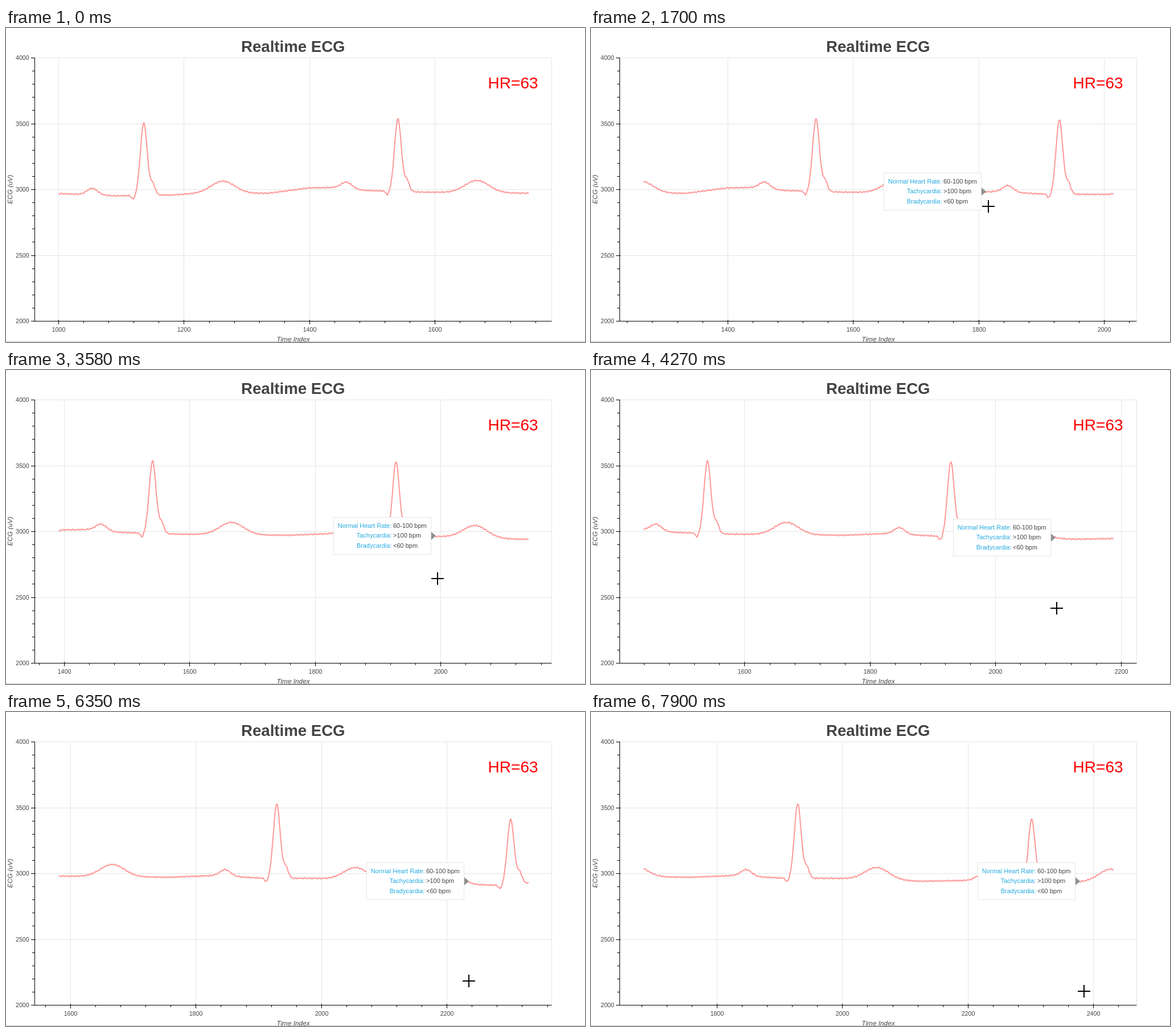
Animation, 1017 px wide and 551 px high, one loop 7990 ms. Source, as an HTML page:

```html
<!DOCTYPE html>
<html lang="en">
<head>
<meta charset="utf-8">
<title>Realtime ECG</title>
<style>
  html, body { margin: 0; width: 100%; height: 100%; overflow: hidden; background: #fff; }
  svg { display: block; width: 100%; height: 100%; font-family: "Liberation Sans", Arial, sans-serif; }
  text { fill: #444; }
  .title { font-size: 27.6px; font-weight: bold; text-anchor: middle; }
  .rate { font-size: 28px; fill: #f00; }
  .tick { font-size: 10.67px; }
  .name { font-size: 11.8px; font-style: italic; text-anchor: middle; }
  .grid { stroke: #e5e5e5; fill: none; }
  .axis { stroke: #000; fill: none; }
  .mid { text-anchor: middle; }
  .end { text-anchor: end; }
  .tip { font-size: 11px; }
  .tip .end { fill: #26aae1; }
</style>
</head>
<body>
<svg viewBox="0 0 1017 551">
  <path d="M0 550.5H1017" stroke="#c8c8c8"/>
  <g id="yAxis"></g>
  <path class="grid" d="M50.5 52.5H958.5V514.5"/>
  <g id="xAxis"></g>
  <path id="trace" fill="none" stroke="#ff9999" stroke-width="2" stroke-linejoin="round"/>
  <path class="axis" d="M50.5 52V515M50 514.5H958.5"/>
  <text class="title" x="504.3" y="42">Realtime ECG</text>
  <text class="rate" x="846.6" y="106">HR=63</text>
  <text class="name" x="504.5" y="550">Time Index</text>
  <text class="name" transform="translate(11 283) rotate(-90)">ECG (uV)</text>
  <g id="tip" class="tip">
    <rect x="-179.5" y="-32.5" width="171" height="65" fill="#fff" stroke="#e5e5e5"/>
    <path d="M-8 -7L0 0L-8 7Z" fill="#909090"/>
  </g>
  <path id="cross" d="M-11 0H11M0 -11V11" stroke="#000" stroke-width="2"/>
</svg>
<script>
const LOOP = 7990, STEP = 77.45;
const FIRST = 1000, LAST = 2450, SPAN = 749;
const LEFT = 50, RIGHT = 958, BOTTOM = 514, ORIGIN = 92.5, SCALE = 1.1021;
const $ = id => document.getElementById(id);

function add(parent, tag, attrs, text = '') {
  const el = document.createElementNS('http://www.w3.org/2000/svg', tag);
  for (const key in attrs) el.setAttribute(key, attrs[key]);
  el.textContent = text;
  return parent.appendChild(el);
}
const snap = v => Math.floor(v) + 0.5;
const move = (el, x, y) => el.setAttribute('transform', `translate(${x} ${y})`);
const show = (el, on) => el.setAttribute('visibility', on ? 'visible' : 'hidden');

// Linear interpolation between rows of [position, ...values]
function at(keys, pos) {
  const i = keys.findIndex(key => key[0] >= pos);
  if (i < 1) return keys.at(i).slice(1);
  const a = keys[i - 1], b = keys[i];
  const u = (pos - a[0]) / (b[0] - a[0]);
  return a.slice(1).map((v, k) => v + (b[k + 1] - v) * u);
}

// The signal: a wandering baseline, and the same set of waves around each beat
const baseline = [
  [1000, 290.5], [1090, 294.5], [1180, 293], [1220, 290.5], [1334, 290], [1400, 280.5],
  [1440, 280], [1490, 285], [1583, 288], [1757, 290], [1827, 287], [1906, 291.5],
  [1990, 292], [2126, 297], [2200, 295.5], [2251, 303], [2280, 304], [2340, 299], [2450, 297]
];
const beats = [[1135.7, 127], [1540.7, 127], [1928.6, 130.5], [2301.4, 114]];
const bell = (d, width) => Math.exp(-d * d / (2 * width * width));

function wave(d, height) {
  const p = 11.5 * bell(d + 82, 8.5);
  const q = -7 * bell(d + 16.5, 2.6);
  const r = height * bell(d, 5.4);
  const s = 19 * bell(d - 14.3, 4);
  const t = 21.5 * bell(d - 126, 19);
  return p + q + r + s + t;
}
function signal(x) {
  const ripple = 0.8 * Math.sin(x * 2 * Math.PI / 4.7) + 0.4 * Math.sin(x * 0.83);
  return beats.reduce((y, [peak, height]) => y - wave(x - peak, height), at(baseline, x)[0] + ripple);
}
const samples = Array.from({ length: LAST - FIRST + 1 }, (_, i) => signal(FIRST + i).toFixed(2));

// Fixed vertical axis
for (let v = 2000; v <= 4000; v += 100) {
  const major = v % 500 === 0;
  const y = snap(514.5 - (v - 2000) * 0.231);
  if (major) {
    add($('yAxis'), 'path', { class: 'grid', d: `M50 ${y}H958` });
    add($('yAxis'), 'text', { class: 'tick end', x: 40.7, y: y + 3.2 }, v);
  }
  add($('yAxis'), 'path', { class: 'axis', d: major ? `M44 ${y}H52` : `M46 ${y}H50` });
}

// Scrolling horizontal axis
const ticks = [];
for (let v = 960; v <= 2480; v += 40) {
  const g = add($('xAxis'), 'g', {});
  const major = v % 200 === 0;
  if (major) {
    add(g, 'path', { class: 'grid', d: 'M0 53V514' });
    add(g, 'text', { class: 'tick mid', y: 532.7 }, v);
  }
  add(g, 'path', { class: 'axis', d: major ? 'M0 512V520' : 'M0 514V518' });
  ticks.push({ v, g });
}

[['Normal Heart Rate:', '60-100 bpm'], ['Tachycardia:', '>100 bpm'], ['Bradycardia:', '<60 bpm']]
  .forEach(([label, value], i) => {
    const y = -14.5 + i * 17.5;
    add($('tip'), 'text', { class: 'end', x: -77.5, y }, label);
    add($('tip'), 'text', { x: -75, y }, value);
  });

// Step number and first visible sample
const scroll = [[0, 1000], [16, 1235], [37, 1344], [66, 1497], [82, 1581], [102, 1683]];
// Step number, cursor x and y, tooltip x and y
const pointer = [
  [11, 989, 540, 985, 290], [18, 698, 313, 694, 287], [37, 698, 313, 694, 287],
  [55, 818, 418, 816, 294], [66, 832, 447, 830, 293], [82, 813, 472, 813, 297],
  [102, 866, 490, 859, 297]
];

function draw(n) {
  const start = Math.round(at(scroll, n)[0]);
  for (const { v, g } of ticks) {
    const x = ORIGIN + (v - start) * SCALE;
    show(g, x >= LEFT && x <= RIGHT);
    move(g, snap(x), 0);
  }
  const points = samples.slice(start - FIRST, start - FIRST + SPAN + 1)
    .map((y, i) => `${(ORIGIN + i * SCALE).toFixed(2)} ${y}`);
  $('trace').setAttribute('d', 'M' + points.join('L'));

  const [x, y, tipX, tipY] = at(pointer, n).map(Math.round);
  const entered = n >= pointer[0][0];
  show($('cross'), entered);
  show($('tip'), entered && x < RIGHT && y < BOTTOM);
  move($('cross'), x, y);
  move($('tip'), tipX, tipY);
}

let begin, last = -1;
function frame(now) {
  begin ??= now;
  const n = Math.floor(((now - begin) % LOOP + 14) / STEP);
  if (n !== last) draw(last = n);
  requestAnimationFrame(frame);
}
draw(0);
requestAnimationFrame(frame);
</script>
</body>
</html>
```
